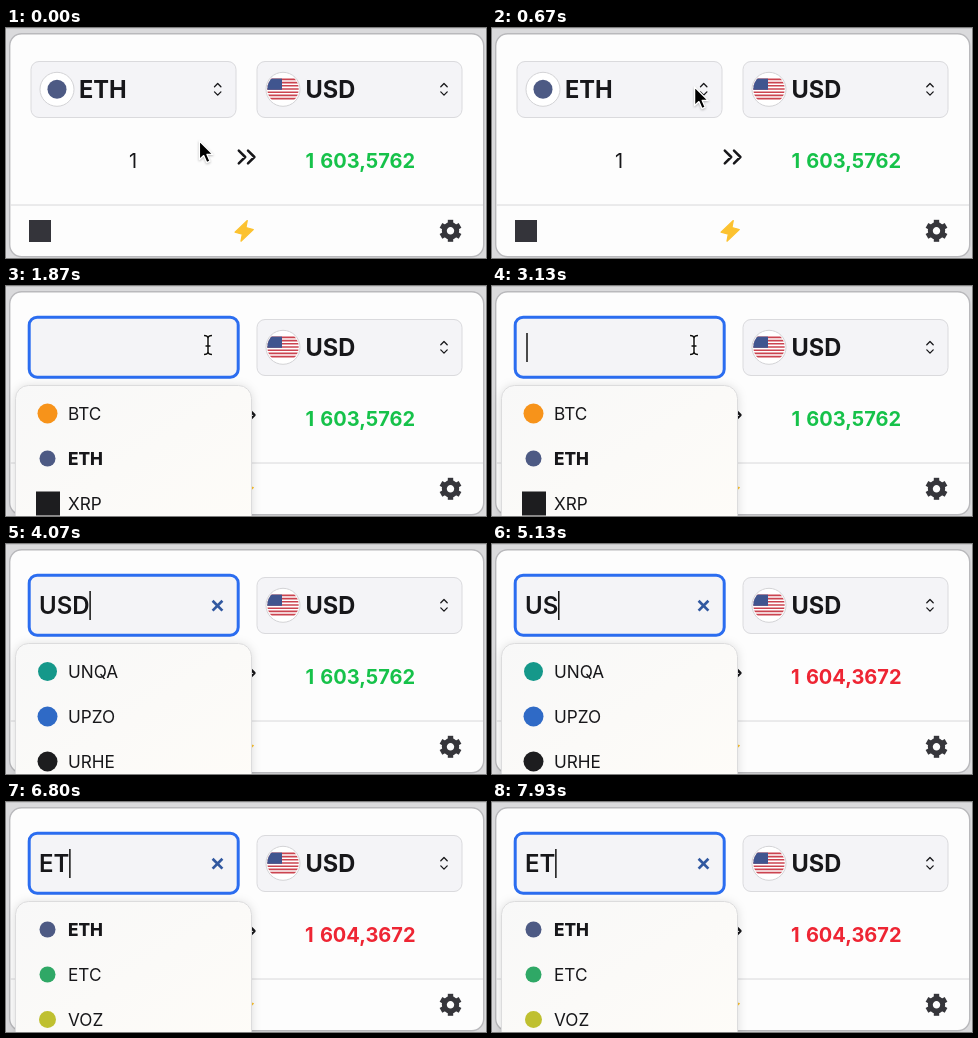
These frames come from a looping animation (480 px wide and 230 px high, 8 s). An HTML page:

```html
<!DOCTYPE html>
<html lang="en">
<head>
<meta charset="utf-8">
<title>Currency converter</title>
<style>
  html, body { margin: 0; height: 100%; overflow: hidden; background: #dadadc; }
  svg { display: block; font-family: Inter, Roboto, sans-serif; fill: #17171a; }
  .big { font-size: 23.6px; font-weight: 700; }
  .row { font-size: 17.2px; }
  .box { fill: #f4f4f7; stroke: #dadadd; }
  .ring { fill: #fff; stroke: #d3d3d6; }
  .line { fill: none; stroke: #17171a; stroke-linecap: round; stroke-linejoin: round; }
  #typed { font-size: 24px; font-weight: 600; }
  #price { font-size: 20px; font-weight: 700; word-spacing: 1.5px; text-anchor: middle; }
  #menu { filter: drop-shadow(0 1px 5px #0002); }
  #arrow { filter: drop-shadow(0 1px 1px #0004); }
</style>
</head>
<body>
<svg width="480" height="230" viewBox="0 0 480 230">
  <defs>
    <clipPath id="disc"><circle cx="277" cy="61" r="15.7"/></clipPath>
    <linearGradient id="paper" x2="1" y2="1">
      <stop stop-color="#f8f8f8"/><stop offset="1" stop-color="#fefcf8"/>
    </linearGradient>
    <path id="sort" class="line" stroke-width="1.3" d="M-3.2-2.6 0-5.8 3.2-2.6M-3.2 2.6 0 5.8 3.2 2.6"/>
  </defs>

  <path d="M0 .5H480" stroke="#c6c6c8"/>
  <rect x="3.7" y="5.7" width="474" height="223" rx="12" fill="#fdfdfd" stroke="#b9b9bc" stroke-width="1.4"/>
  <path d="M4.5 177H477" stroke="#d8d8da"/>

  <g id="from">
    <rect class="box" x="25" y="33.5" width="205" height="56" rx="8"/>
    <circle class="ring" cx="51" cy="61.3" r="17"/>
    <circle cx="51" cy="61.3" r="9.5" fill="#4d5a84"/>
    <text class="big" x="73" y="70.4">ETH</text>
    <use href="#sort" x="211.7" y="61.3"/>
  </g>

  <rect class="box" x="251" y="33.5" width="205" height="56" rx="8"/>
  <circle class="ring" cx="277" cy="61.3" r="17"/>
  <g clip-path="url(#disc)">
    <path d="M277 50.6V71.4" stroke="#cb4450" stroke-width="32" stroke-dasharray="1.6"/>
    <rect x="261" y="50.6" width="15" height="11.2" fill="#40558f"/>
  </g>
  <text class="big" x="299.5" y="70.4">USD</text>
  <use href="#sort" x="438" y="61.3"/>

  <text x="127" y="139.5" font-size="20" text-anchor="middle">1</text>
  <path class="line" stroke-width="2.5" d="M232.8 122.7 239.2 129 232.8 135.3M242 122.7 248.4 129 242 135.3"/>
  <text id="price" x="354.3" y="139.5"></text>

  <rect x="23" y="192" width="22" height="22" fill="#34343a"/>
  <path d="M241.3 192.5 229 204.2 236.3 206.2 235 213.2 247.3 201.5 240 199.5Z" fill="#fcc230" stroke="#fcc230" stroke-width="1.2" stroke-linejoin="round"/>
  <g id="gear" transform="translate(444.5 202.8)" fill="none" stroke="#36363b">
    <circle r="6.2" stroke-width="5"/>
  </g>

  <g id="field">
    <rect x="23.2" y="31.2" width="209" height="60" rx="8" fill="#f4f4f7" stroke="#2b6df0" stroke-width="3"/>
    <text id="typed" x="33" y="70.4"></text>
    <path id="caret" d="M0 47V76" stroke="#111" stroke-width="1.5"/>
    <path id="clear" d="M206.6 56.8 216.4 66.6M216.4 56.8 206.6 66.6" stroke="#3158a0" stroke-width="2.7"/>
  </g>
  <g id="menu">
    <rect x="9.5" y="99.5" width="236" height="150" rx="13" fill="url(#paper)" stroke="#dcdcdd"/>
    <g id="rows"></g>
  </g>

  <path id="arrow" d="M0 0V18.5L4.3 14.6 7.3 21.6 10.6 20.2 7.6 13.4H13.4Z" fill="#000" stroke="#fff" stroke-width="1.3" stroke-linejoin="round"/>
  <g id="beam" fill="none">
    <path id="stem" d="M198 49.5Q202 49.5 202 52.5Q202 49.5 206 49.5M202 52V66M198 68.5Q202 68.5 202 65.5Q202 68.5 206 68.5M199.5 60H204.5" stroke="#fff" stroke-width="3.4"/>
  </g>
</svg>
<script>
const LOOP = 8000, OPEN = 1000, BLINK = 530, PRICE_AT = 4800;
const $ = id => document.getElementById(id);
const show = (id, on) => $(id).style.display = on ? '' : 'none';

// dark I-beam over its white outline
const ink = $('stem').cloneNode();
ink.removeAttribute('id');
ink.setAttribute('stroke', '#111');
ink.setAttribute('stroke-width', 1.5);
$('beam').append(ink);

for (let a = 0; a < 360; a += 60)
  $('gear').innerHTML += `<path d="M0-7V-11" stroke-width="5.4" transform="rotate(${a})"/>`;

const dot = (color, r) => y => `<circle cx="41.5" cy="${y}" r="${r}" fill="${color}"/>`;
const square = color => y => `<rect x="30" y="${y - 12}" width="24" height="24" fill="${color}"/>`;
const eth = ['ETH', dot('#4d5a84', 8)];
const lists = {
  all: [['BTC', dot('#f7931a', 10)], eth, ['XRP', square('#1d1d1f')]],
  u: [['UNQA', dot('#15988a', 9.5)], ['UPZO', dot('#2f6ac6', 10)], ['URHE', dot('#1d1d1f', 10)]],
  e: [eth, ['ETC', dot('#2fa866', 8)], ['VOZ', dot('#bfc030', 8.5)]]
};

// time of each edit and the text after it
const edits = [
  [OPEN, ''], [3640, 'U'], [3780, 'US'], [3920, 'USD'],
  [5130, 'US'], [5270, 'U'], [5940, ''], [6330, 'E'], [6540, 'ET']
];

let shown;
function fillRows(key) {
  if (key === shown) return;
  shown = key;
  $('rows').innerHTML = lists[key].map(([name, icon], i) => {
    const y = 127.5 + 45 * i;
    return icon(y) + `<text class="row" x="62" y="${y + 6.2}" font-weight="${name === 'ETH' ? 800 : 400}">${name}</text>`;
  }).join('');
}

const ease = p => p * p * (3 - 2 * p);
const ramp = (t, from, to) => Math.min(1, Math.max(0, (t - from) / (to - from)));

function draw(t) {
  const open = t >= OPEN, rose = t >= PRICE_AT;
  const [since, text] = edits.findLast(e => e[0] <= t) || edits[0];

  const p = ease(ramp(t, 70, 670));
  $('arrow').setAttribute('transform', `translate(${193.4 + 9.2 * p} ${113 - 54 * p})`);
  show('arrow', !open);
  show('beam', open && t < edits[1][0]);
  show('from', !open);
  show('field', open);
  show('menu', open);
  $('menu').style.opacity = ramp(t, OPEN - 50, OPEN + 120);

  $('typed').textContent = text;
  const end = text ? 33.5 + $('typed').getComputedTextLength() : 35;
  $('caret').setAttribute('transform', `translate(${end})`);
  show('caret', Math.floor((t - since) / BLINK) % 2 === 0);
  show('clear', text);
  fillRows(text ? text[0].toLowerCase() : 'all');

  $('price').textContent = rose ? '1 604,3672' : '1 603,5762';
  $('price').setAttribute('fill', rose ? '#ee2533' : '#16c24a');
}

function tick(now) {
  draw(now % LOOP);
  requestAnimationFrame(tick);
}
draw(0);
requestAnimationFrame(tick);
</script>
</body>
</html>
```
